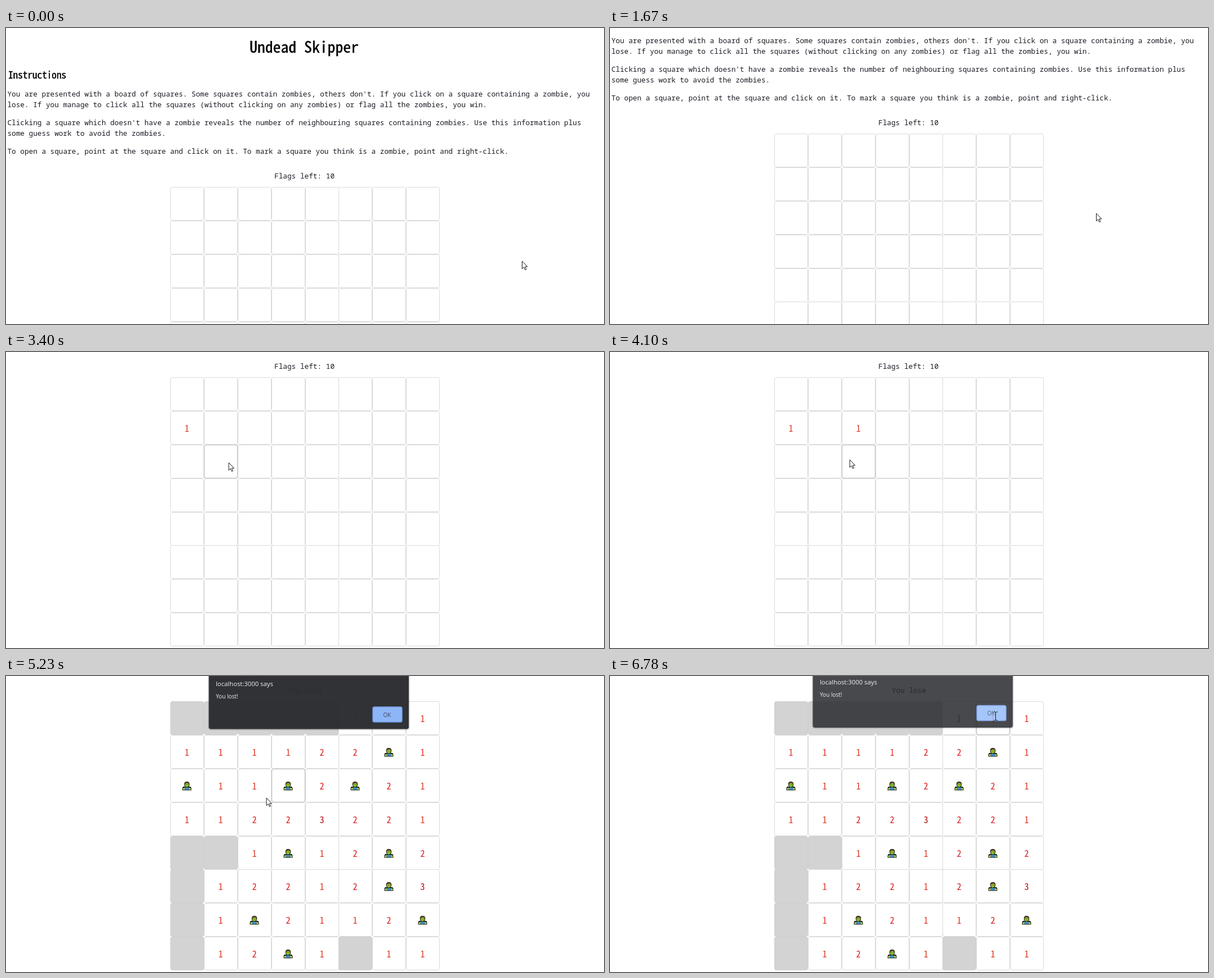
These frames come from a looping animation (1063x527 px, 6.83 s). An HTML page:

```html
<!DOCTYPE html>
<html lang="en">
<head>
<meta charset="utf-8">
<title>Undead Skipper</title>
<style>
html, body { margin: 0; width: 100%; height: 100%; overflow: hidden; background: #fff; }
svg { display: block; width: 1063px; height: 527px; }
text { font-variant-ligatures: none; }
.ui { font-family: "Open Sans", "Noto Sans", sans-serif; }
</style>
</head>
<body>
<svg viewBox="0 0 1063 527">
  <g id="page"></g>
  <g id="dialog">
    <rect x="359" y="-12" width="359" height="109" rx="5" fill="#000" opacity=".14"/>
    <rect x="360.5" y="-12" width="355.5" height="107" rx="4" fill="#2b2c2f"/>
    <g class="ui" fill="#eceef0">
      <text x="373" y="18" font-size="11.3">localhost:3000 says</text>
      <text x="373" y="40" font-size="10">You lost!</text>
    </g>
    <rect id="button" x="652" y="55.5" width="52" height="27" rx="3" fill="#8ab4f8" stroke="#6f9ae6" stroke-width="1.5"/>
    <text class="ui" x="677.5" y="73" font-size="10" fill="#35415c" text-anchor="middle">OK</text>
  </g>
  <path id="arrow" d="M0 0V13.6L3.1 10.8L5.3 15.6L7.4 14.7L5.2 10H9.4Z" fill="#fff" stroke="#15151f" stroke-linejoin="round"/>
  <path id="beam" d="M-3.5-7H-1L0-6L1-7H3.5M0-6V7M-3.5 8H-1L0 7L1 8H3.5" fill="none" stroke="#15151f"/>
</svg>
<script>
const LOOP = 6830, STEP = 54;
const LEFT = 292.2, TOP = 283.2, PITCH = 59.83, SIZE = 59, N = 8;
const REVEAL = 5082, CLOSE = 6690;
const TALL = '"Noto Sans Mono CJK KR", "Noto Sans Mono CJK JP", "Liberation Mono", monospace';
const WIDE = '"Noto Sans Mono", "DejaVu Sans Mono", monospace';
const $ = id => document.getElementById(id);
const page = $('page');

function add(parent, tag, attrs, text) {
  const el = document.createElementNS('http://www.w3.org/2000/svg', tag);
  for (const k in attrs) el.setAttribute(k, attrs[k]);
  if (text !== undefined) el.textContent = text;
  parent.appendChild(el);
  return el;
}
const show = (el, on) => el.setAttribute('visibility', on ? 'visible' : 'hidden');
const place = (el, x, y) => el.setAttribute('transform', `translate(${x} ${y})`);

// picks the font size that gives the wanted character advance
const pen = document.createElement('canvas').getContext('2d');
function mono(x, y, advance, text, font = WIDE, more = {}) {
  pen.font = '100px ' + font;
  const size = advance * 100 / pen.measureText('0').width;
  return add(page, 'text', { x, y, 'font-family': font, 'font-size': size, 'font-weight': 400, fill: '#1c1a24', ...more }, text);
}
const heavy = w => ({ stroke: '#000', 'stroke-width': w, fill: '#000' });

mono(433, 43.5, 13.86, 'Undead Skipper', TALL, heavy(.5));
mono(4, 89.5, 8.6, 'Instructions', TALL, heavy(.4));
[
  ["You are presented with a board of squares. Some squares contain zombies, others don't. If you click on a square containing a zombie, you",
   'lose. If you manage to click all the squares (without clicking on any zombies) or flag all the zombies, you win.'],
  ["Clicking a square which doesn't have a zombie reveals the number of neighbouring squares containing zombies. Use this information plus",
   'some guess work to avoid the zombies.'],
  ['To open a square, point at the square and click on it. To mark a square you think is a zombie, point and right-click.']
].forEach((lines, p) => lines.forEach((text, i) => mono(2.5, 122 + p * 51 + i * 19, 7.615, text)));
const flags = mono(477, 268, 7.66, 'Flags left: 10');
const lose = mono(501, 268, 7.6, 'You lose');

// board: row and column of each zombie, and of each clicked square with its time
const zombies = '16 20 23 25 43 46 56 62 67 73'.split(' ');
const clicked = { '10': 3140, '12': 3870, '31': 4540 };
const inks = ['', '#e03a26', '#dc1c1e', '#b40c12'];
const cellX = c => Math.round(LEFT + c * PITCH) + .5;
const cellY = r => Math.round(TOP + r * PITCH) + .5;
const count = (r, c) => zombies.filter(z => Math.abs(z[0] - r) < 2 && Math.abs(z[1] - c) < 2).length;

function drawZombie(x, y) {
  const g = add(page, 'g', {});
  place(g, x, y);
  const part = (d, fill) => add(g, 'path', { d, fill });
  part('M-4.8-3Q-4.8-8 0-8T4.8-3Q4.6 0 3 1H6Q8 1.5 8 5V7.5H-8V5Q-8 1.5-6 1H-3Q-4.6 0-4.8-3Z', '#10140c');
  part('M-3.8-3Q-3.8-6.5 0-6.5T3.8-3Q3.4 1.2 0 1.6T-3.8-3Z', '#93bd2c');
  part('M-3.6-4Q-3-7.2 0-7.2T3.6-4L1-5.2Z', '#6b4228');
  part('M-2-3H-1V-2H-2ZM1-3H2V-2H1Z', '#1c2410');
  part('M-4 2.5H4V6.5H-4Z', '#3a93d0');
  part('M-7 4L-4 2.4V6.5H-7ZM7 4L4 2.4V6.5H7Z', '#d0d83a');
  return g;
}

const cells = [];
for (let r = 0; r < N; r++) for (let c = 0; c < N; c++) {
  const x = cellX(c), y = cellY(r), key = `${r}${c}`;
  const n = count(r, c), zombie = zombies.includes(key);
  const box = add(page, 'rect', { x, y, width: SIZE, height: SIZE, rx: 3 });
  let mark = null;
  if (zombie) mark = drawZombie(x + 29, y + 30.5);
  else if (n) mark = mono(x + 29, y + 36.5, 8.1, n, TALL, { 'text-anchor': 'middle', fill: inks[n] });
  cells.push({ box, mark, time: clicked[key] || REVEAL });
}
const glow = add(page, 'rect', { width: SIZE, height: SIZE, rx: 3, fill: 'none', stroke: '#cacaca', 'stroke-width': 1.5 });

// progress from 0 to 1 in even steps; the first step lands on t0, the last on t1
function run(t, t0, t1) {
  const n = Math.round((t1 - t0) / STEP);
  const k = Math.floor((t - t0) / (t1 - t0) * n + 1e-6) + 1;
  return Math.max(0, Math.min(1, k / (n + 1)));
}

// pointer: start, end, x, y
const moves = [
  [50, 340, 854, 361], [480, 690, 864.5, 330], [1950, 2010, 837, 333],
  [2150, 2340, 498, 380], [2480, 2950, 328, 148],
  [3140, 3383, 396, 197], [3432, 3820, 452, 148], [3870, 4540, 385, 262],
  [4590, 4787, 488, 238], [4836, 5033, 500, 212], [REVEAL, 5230, 463, 217],
  [5280, 5920, 674, 61], [5970, 6120, 685.5, 70]
];
function pointer(t) {
  let x = 917.5, y = 415;
  for (const [t0, t1, toX, toY] of moves) {
    const u = run(t, t0, t1);
    x += (toX - x) * u;
    y += (toY - y) * u;
  }
  return [x, y];
}

const speedUp = u => u * (.365 + .635 * u);
const scrolled = t => Math.round(85 * speedUp(run(t, 1150, 1300)) + 153 * speedUp(run(t, 1670, 2010)));

function hovered(t, x, y) {
  if (t >= CLOSE) return [0, 6];
  if (t >= REVEAL) return [2, 3];
  const r = Math.floor((y - TOP) / PITCH), c = Math.floor((x - LEFT) / PITCH);
  return r >= 0 && r < N && c >= 0 && c < N ? [r, c] : null;
}

function render(t) {
  const shift = scrolled(t), [x, y] = pointer(t);
  place(page, 0, -shift);
  show(flags, t < REVEAL);
  show(lose, t >= REVEAL);
  for (const { box, mark, time } of cells) {
    const open = t >= time, grey = open && !mark;
    box.setAttribute('fill', grey ? '#d3d3d3' : '#fff');
    box.setAttribute('stroke', grey ? '#d0d0d0' : '#dadada');
    if (mark) show(mark, open);
  }
  const cell = hovered(t, x, y + shift);
  show(glow, cell);
  if (cell) place(glow, cellX(cell[1]), cellY(cell[0]));

  const away = (1 - run(t, 5131, 5280)) ** 2.5, leave = run(t, CLOSE, 6780);
  $('dialog').setAttribute('opacity', 1 - away - .14 * leave ** 2);
  place($('dialog'), 0, -14 * away - 3 * leave);
  $('button').setAttribute('fill', t >= 5870 ? '#97bdfa' : '#8ab4f8');

  show($('arrow'), leave < 1);
  show($('beam'), leave === 1);
  place($('arrow'), x, y);
  place($('beam'), x, y + 1);
}

const start = performance.now();
function tick() {
  render((performance.now() - start) % LOOP);
  requestAnimationFrame(tick);
}
render(0);
requestAnimationFrame(tick);
</script>
</body>
</html>
```
